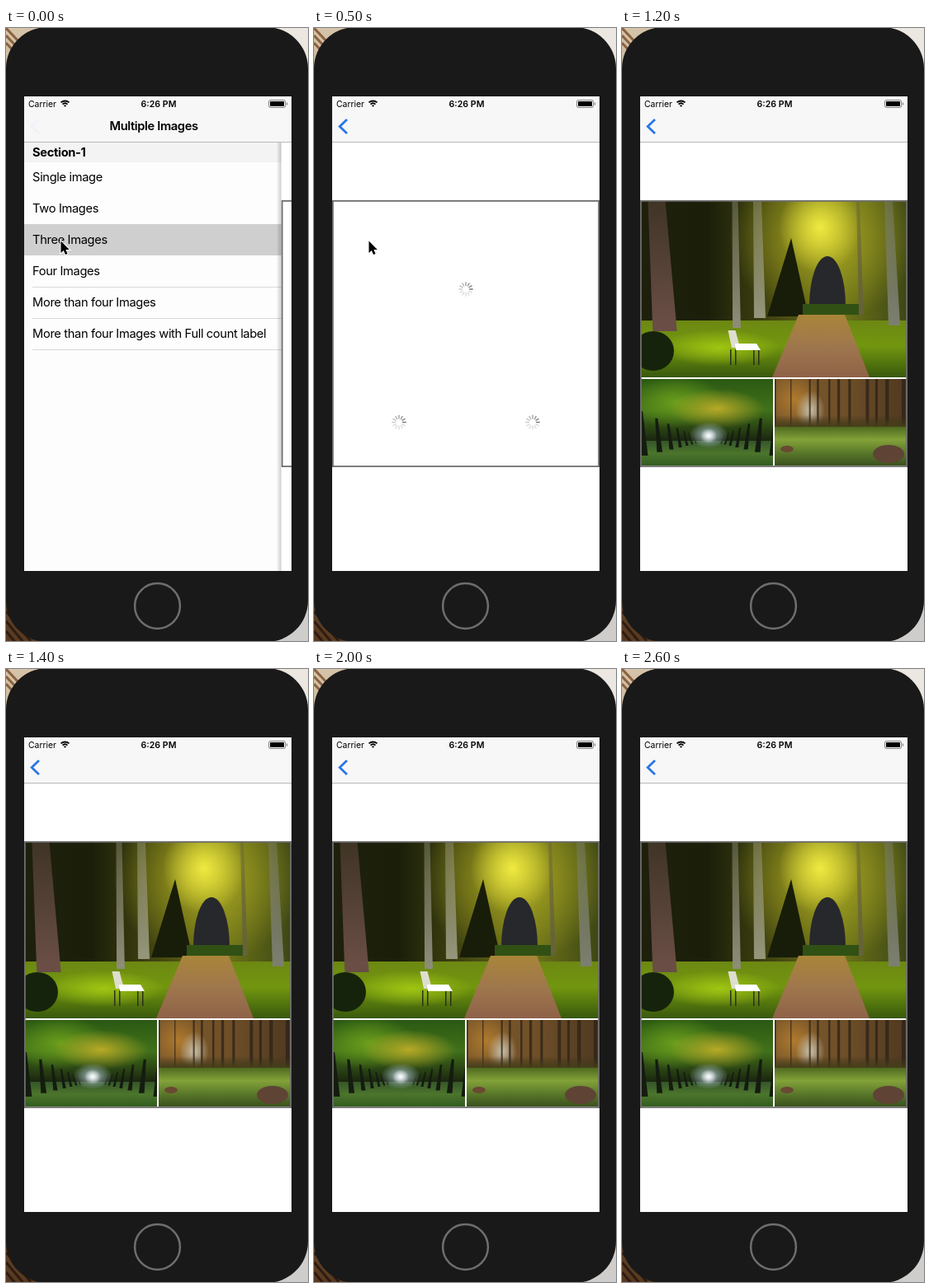
Write an HTML page with a canvas that moves like this. It is 366 by 744 pixels and loops after 2.7 s.

```html
<!DOCTYPE html>
<html lang="en">
<head>
<meta charset="utf-8">
<title>Image grid</title>
<style>
  html, body { margin: 0; width: 366px; height: 744px; overflow: hidden; }
  canvas { display: block; }
</style>
</head>
<body>
<canvas id="stage" width="366" height="744"></canvas>
<script>
const ctx = document.getElementById('stage').getContext('2d');
const LOOP = 2700, STEP = 100, PUSH_END = 500, CURSOR_UNTIL = 1200;
const LEFT = 22, TOP = 83, WIDTH = 324, HEIGHT = 576, BAR = 139;
const ROW = 38, FIRST_ROW = 163, SELECTED = 2;
const ROWS = ['Single image', 'Two Images', 'Three Images', 'Four Images',
  'More than four Images', 'More than four Images with Full count label'];

function rect(color, x, y, w, h) {
  ctx.fillStyle = color;
  ctx.fillRect(x, y, w, h);
}

function round(color, x, y, w, h, r) {
  ctx.beginPath();
  ctx.roundRect(x, y, w, h, r);
  ctx.fillStyle = color;
  ctx.fill();
}

function line(color, width, ...points) {
  ctx.beginPath();
  for (let i = 0; i < points.length; i += 2) ctx.lineTo(points[i], points[i + 1]);
  ctx.strokeStyle = color;
  ctx.lineWidth = width;
  ctx.stroke();
}

function arc(color, width, x, y, r, from = 0, to = 7) {
  ctx.beginPath();
  ctx.arc(x, y, r, from, to);
  ctx.strokeStyle = color;
  ctx.lineWidth = width;
  ctx.stroke();
}

// Filled ellipse, or its upper half when from is Math.PI.
function oval(color, x, y, rx, ry, from = 0) {
  ctx.beginPath();
  ctx.ellipse(x, y, rx, ry, 0, from, 2 * Math.PI);
  ctx.fillStyle = color;
  ctx.fill();
}

// Upright shape, centred on x0 at the top and x1 at the bottom.
function taper(color, x0, y0, w0, x1, y1, w1) {
  ctx.beginPath();
  ctx.moveTo(x0 - w0 / 2, y0);
  ctx.lineTo(x0 + w0 / 2, y0);
  ctx.lineTo(x1 + w1 / 2, y1);
  ctx.lineTo(x1 - w1 / 2, y1);
  ctx.fillStyle = color;
  ctx.fill();
}

function fade(x0, y0, x1, y1, ...colors) {
  const g = ctx.createLinearGradient(x0, y0, x1, y1);
  colors.forEach((c, i) => g.addColorStop(i / (colors.length - 1), c));
  return g;
}

function glow(color, x, y, rx, ry) {
  ctx.save();
  ctx.translate(x, y);
  ctx.scale(rx, ry);
  const g = ctx.createRadialGradient(0, 0, 0, 0, 0, 1);
  g.addColorStop(0, color);
  g.addColorStop(1, color + '00');
  rect(g, -1, -1, 2, 2);
  ctx.restore();
}

function text(str, x, y, { weight = 400, size = 14.7, spacing = -0.37, align = 'left' } = {}) {
  ctx.font = `${weight} ${size}px Inter, sans-serif`;
  ctx.letterSpacing = spacing + 'px';
  ctx.textAlign = align;
  ctx.fillStyle = '#000';
  ctx.fillText(str, x, y);
}

function randomizer(seed) {
  return () => (seed = seed * 16807 % 2147483647) / 2147483647;
}

function clipped(x, y, w, h, draw) {
  ctx.save();
  ctx.beginPath();
  ctx.rect(x, y, w, h);
  ctx.clip();
  draw(x, y, w, h);
  ctx.restore();
}

function parkPhoto(x, y, w, h) {
  const trunk = (color, at, lean, width, base) =>
    taper(fade(0, y, 0, y + h * 0.7, color + '70', color), x + at, y, width, x + at + lean, y + base, width * 1.4);
  rect(fade(x, 0, x + w, 0, '#1e200c', '#1b1f0a', '#434610', '#6d7418', '#3e4715'), x, y, w, h);
  glow('#a8a521', x + 222, y + 45, 115, 100);
  glow('#f0ea40', x + 217, y + 32, 50, 55);
  taper('#181d09', x + 182, y + 45, 0, x + 178, y + 140, 50);
  rect(fade(0, y + 138, 0, y + h, '#6b8513', '#72960f', '#38580c'), x, y + 145, w, h);
  glow('#a0c512', x + 95, y + 178, 75, 22);
  taper(fade(0, y + 138, 0, y + h, '#a98539', '#9f774d', '#8e6248'), x + 219, y + 138, 56, x + 218, y + h, 118);
  oval('#26282c', x + 226, y + 127, 22, 60, Math.PI);
  rect('#315014', x + 196, y + 125, 68, 13);
  trunk('#6a4e46', 19, 10, 21, 158);
  trunk('#8d8c78', 114, 2, 7, 154);
  trunk('#99997f', 141, 3, 10, 142);
  trunk('#66613c', 263, 4, 4, 138);
  trunk('#7c7f70', 300, 7, 10, 151);
  oval('#16230c', x + 15, y + 182, 25, 24);
  for (const leg of [108, 114, 136, 142]) rect('#2c2f1e', x + leg, y + 180, 1.5, 19);
  taper('#deded0', x + 110, y + 157, 9, x + 115, y + 178, 10);
  taper('#fff', x + 127, y + 173, 26, x + 130, y + 181, 30);
}

function avenuePhoto(x, y, w, h) {
  const mid = x + w / 2 + 2, horizon = y + 75;
  rect(fade(0, y, 0, horizon, '#2b5913', '#41711a', '#1a250f'), x, y, w, h);
  glow('#699d1b', x + 42, y + 28, 60, 32);
  glow('#b7a927', x + 92, y + 36, 58, 24);
  rect(fade(0, horizon, 0, y + h, '#35552a', '#4c752c', '#335d20'), x, horizon, w, h);
  for (let i = 0; i < 7; i++) {
    const spread = 78 * 0.76 ** i, size = spread / 78;
    for (const side of [-1, 1])
      taper('#141c10', mid + side * (spread + 4), horizon - 36 * size, 4 * size,
        mid + side * spread, horizon + 18 * size, 9 * size);
  }
  glow('#a9c0c8', mid, horizon - 7, 24, 16);
  glow('#ffffff', mid, horizon - 6, 10, 9);
}

function meadowPhoto(x, y, w, h) {
  const random = randomizer(11), ground = y + 58;
  rect(fade(x, 0, x + w, 0, '#7e5a2b', '#705028', '#4f3921'), x, y, w, h);
  glow('#b07a2d', x + 24, y + 25, 32, 32);
  glow('#c9c0ab', x + 43, y + 38, 18, 24);
  for (let i = 0; i < 11; i++)
    rect('#2d2218c0', x + (i + random()) * w / 11, y, 1 + random() * 1.5 + i * 0.25, h);
  rect(fade(0, ground - 14, 0, ground, '#3a301a00', '#454019'), x, ground - 14, w, 14);
  rect(fade(0, ground, 0, y + h, '#4e691f', '#83a239', '#5a792a', '#3a511d'), x, ground, w, h);
  oval('#6a4a32', x + 15, y + 85, 8, 4);
  oval('#5f4436', x + 138, y + 91, 19, 11);
}

const PHOTOS = [
  { at: 700, box: [23, 210, 322, 214], draw: parkPhoto },
  { at: 1100, box: [23, 426, 160, 105], draw: avenuePhoto },
  { at: 1200, box: [185, 426, 160, 105], draw: meadowPhoto },
];

function spinner(x, y, t) {
  const head = Math.round(t * 12 / 1000) + 9;
  ctx.lineCap = 'round';
  for (let i = 0; i < 12; i++) {
    const c = Math.cos((i - 3) * Math.PI / 6), s = Math.sin((i - 3) * Math.PI / 6);
    const grey = Math.min(218, 120 + (head - i + 12) % 12 * 14);
    line(`rgb(${grey},${grey},${grey})`, 1.4, x + 4.6 * c, y + 4.6 * s, x + 8.2 * c, y + 8.2 * s);
  }
  ctx.lineCap = 'butt';
}

function phone() {
  rect(fade(0, 0, 0, 744, '#d5c4a9', '#58391f'), 0, 0, 183, 744);
  rect(fade(0, 0, 0, 744, '#ece8e1', '#cfcdcb'), 183, 0, 183, 744);
  for (let i = 0; i < 3; i++) {
    line('#8d6240', 3, 0, i * 9, 30, i * 9 + 32);
    line('#2d1c12', 3, 0, 708 + i * 12, 30, 744 + i * 12);
  }
  round('#191919', 0, -1, 366, 746, 50);
  arc('#6e6e6e', 2.5, 183.5, 701.5, 27.4);
}

function list(p) {
  const dx = -0.3 * WIDTH * p, left = LEFT + 13.8 + dx;
  rect('#fff', LEFT, TOP, WIDTH, HEIGHT);
  rect('#f5f5f5', LEFT, BAR, WIDTH, FIRST_ROW - BAR);
  text('Section-1', left, 156, { weight: 700 });
  rect('#d1d1d1', LEFT + dx, FIRST_ROW - 1 + SELECTED * ROW, WIDTH, ROW);
  ROWS.forEach((label, i) => {
    const y = FIRST_ROW + i * ROW;
    text(label, left, y + 23.3);
    if (i > SELECTED) rect('#dadada', left, y + ROW - 1, WIDTH, 1);
  });
  rect(`rgba(0,0,0,${0.1 * p + 0.004})`, LEFT, TOP, WIDTH, HEIGHT);
}

function detail(p, t) {
  ctx.save();
  ctx.translate(WIDTH * (1 - p), 0);
  rect(fade(LEFT - 6, 0, LEFT, 0, '#0000', '#0003'), LEFT - 6, BAR, 6, HEIGHT);
  rect('#fff', LEFT, TOP, WIDTH, HEIGHT);
  for (const { at, box, draw } of PHOTOS) {
    const [x, y, w, h] = box;
    if (t >= at) clipped(...box, draw);
    else spinner(x + w / 2, y + h / 2, t);
  }
  ctx.strokeStyle = '#6f6f6f';
  ctx.lineWidth = 1.8;
  ctx.strokeRect(LEFT + 0.9, 209.9, WIDTH - 1.8, 322.2);
  ctx.restore();
}

function navBar(p) {
  rect('#f7f7f7', LEFT, TOP, WIDTH, BAR - TOP);
  rect('#b9b9b9', LEFT, BAR - 1, WIDTH, 1);
  ctx.globalAlpha = Math.min(1, Math.max(0, 1.06 - 1.6 * p));
  text('Multiple Images', 184 - 130 * p, 124.4, { weight: 600, align: 'center' });
  ctx.globalAlpha = p;
  line('#2a76e6', 2.8, 40, 111, 31.2, 119.5, 40, 128);
  ctx.globalAlpha = 1;
}

function statusBar() {
  text('Carrier', 27, 95.7, { size: 10.4, spacing: 0 });
  text('6:26 PM', 185, 95.7, { weight: 600, size: 10.6, spacing: 0, align: 'center' });
  for (const r of [1.5, 4.5, 7.5]) arc('#000', 1.8, 71.5, 96, r, -2.3, -0.84);
  round('#888', 318, 87, 21, 10, 3);
  round('#f7f7f7', 319, 88, 19, 8, 2);
  round('#000', 320, 89, 17, 6, 1);
  round('#888', 339.8, 90.3, 1.3, 3.4, 0.6);
}

function cursor() {
  const arrow = new Path2D('M66.5 258.5v14.5l3.3-3 2.2 5 2.6-1-2.2-5h4.4z');
  ctx.strokeStyle = '#fff';
  ctx.lineWidth = 2;
  ctx.stroke(arrow);
  ctx.fillStyle = '#000';
  ctx.fill(arrow);
}

// Critically damped spring, already under way when the loop starts.
function pushProgress(t) {
  if (t >= PUSH_END) return 1;
  const s = 0.016 * (t + 19);
  return 1 - (1 + s) * Math.exp(-s);
}

function frame(now) {
  const t = Math.floor((now % LOOP) / STEP) * STEP;
  const p = pushProgress(t);
  phone();
  clipped(LEFT, TOP, WIDTH, HEIGHT, () => {
    list(p);
    detail(p, t);
    navBar(p);
    statusBar();
  });
  if (t < CURSOR_UNTIL) cursor();
}

const start = performance.now();
function tick() {
  frame(performance.now() - start);
  requestAnimationFrame(tick);
}
tick();
</script>
</body>
</html>
```
